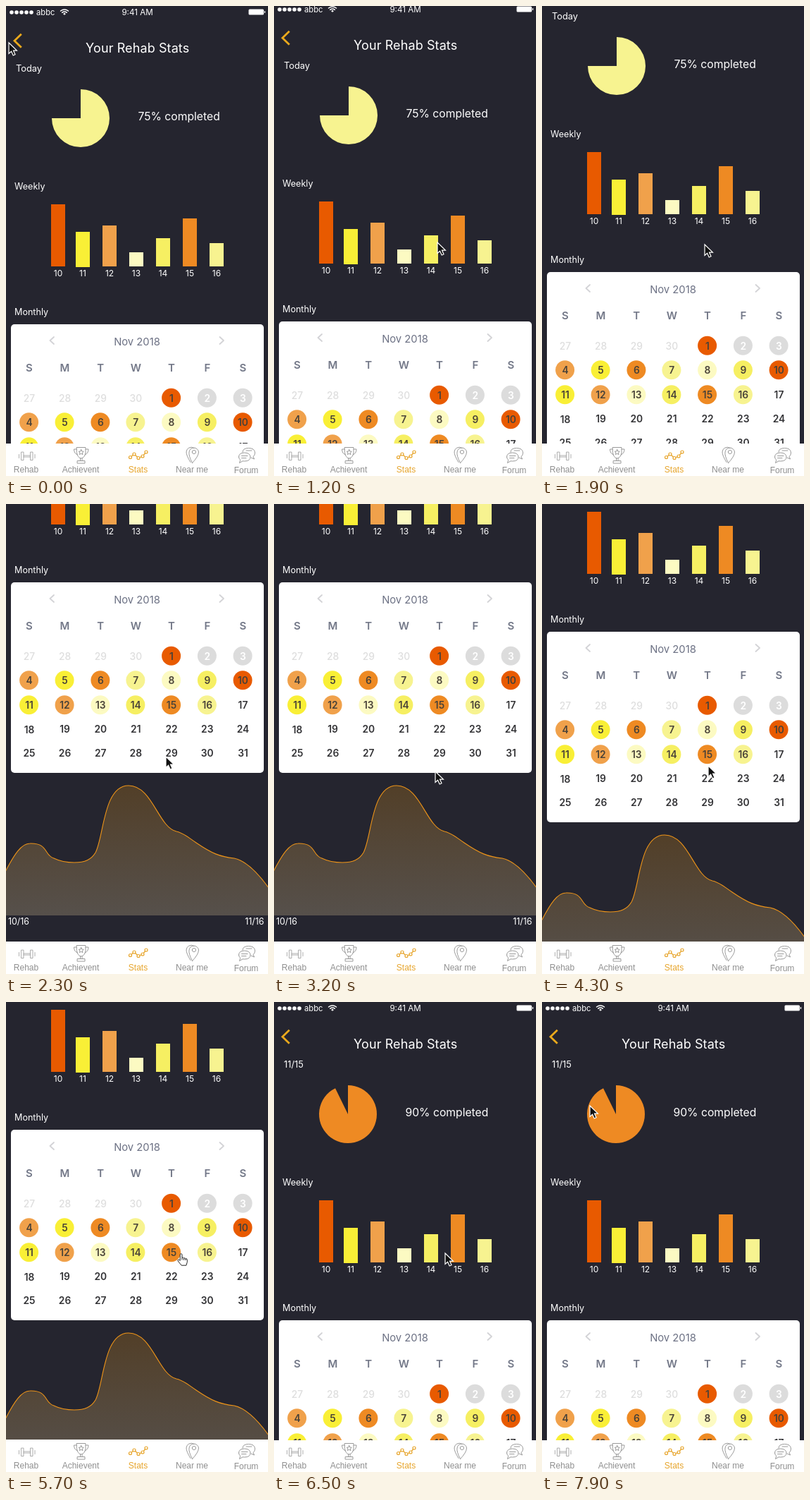
Write an HTML page that moves like this. It is 372 px wide and 666 px high and loops after 8 s.

```html
<!DOCTYPE html>
<html lang="en">
<head>
<meta charset="utf-8">
<title>Rehab stats</title>
<style>
  html, body { margin: 0; width: 100%; height: 100%; overflow: hidden; background: #25252f; }
  svg { display: block; width: 372px; height: 666px; font-family: Inter, Roboto, sans-serif; }
  .line { fill: none; stroke-linecap: round; stroke-linejoin: round; }
  .tab { font-family: "Liberation Sans", Arial, sans-serif; }
</style>
</head>
<body>
<svg id="stage" viewBox="0 0 372 666">
  <defs>
    <linearGradient id="hill" x1="0" y1="0" x2="0" y2="1">
      <stop offset="0" stop-color="#523f28"/>
      <stop offset="1" stop-color="#56504b"/>
    </linearGradient>
  </defs>
  <rect width="372" height="666" fill="#25252f"/>
  <g id="page"></g>
  <g id="tabs"></g>
  <g id="cursor">
    <path id="arrow" d="M0 0V15.5L3.6 12.2L6.2 18L9 16.8L6.5 11.1H11.4Z" fill="#111" stroke="#fff" stroke-width="1.2"/>
    <path id="hand" d="M4.2 10.5V2.3Q4.2.7 5.6.7T7 2.3V6.5Q9 5.4 9.6 7Q11.5 6.2 12 7.8Q14.3 7.2 14.3 9.5V12.5L12.9 17.2H6.2Q3.6 14.3 1 10.7Q.7 9 2.4 9Z M7 6.5V9.5 M9.6 7.2V9.8 M12 8V10" fill="#fff" stroke="#222" stroke-width="1"/>
  </g>
</svg>
<script>
const NS = "http://www.w3.org/2000/svg";
const $ = id => document.getElementById(id);
const page = $("page"), tabs = $("tabs");

function add(parent, tag, attrs, text) {
  const el = document.createElementNS(NS, tag);
  for (const k in attrs) el.setAttribute(k, attrs[k]);
  if (text !== undefined) el.textContent = text;
  parent.appendChild(el);
  return el;
}
const rect = (p, x, y, width, height, fill, rx = 0) => add(p, "rect", { x, y, width, height, fill, rx });
const dot = (p, cx, cy, r, fill) => add(p, "circle", { cx, cy, r, fill });
const line = (p, d, stroke, width = 1) => add(p, "path", { d, stroke, "stroke-width": width, class: "line" });
// y is the vertical middle of the capitals
const label = (p, s, x, y, size, fill = "#fff", more = {}) =>
  add(p, "text", { x, y: y + size * 0.364, "font-size": size, fill, ...more }, s);
const mid = { "text-anchor": "middle" };

const RED = "#e85a00", YELLOW = "#f9ef36", TAN = "#f0a14b", PALE = "#fcfac2",
      LEMON = "#f6ef62", ORANGE = "#ee8a23", CREAM = "#f7f390", GREY = "#dcdcdc";
const dayColors = [RED, GREY, GREY, TAN, YELLOW, ORANGE, CREAM, PALE, LEMON,
                   RED, YELLOW, TAN, PALE, LEMON, ORANGE, CREAM];

// status bar and title
for (let i = 0; i < 5; i++) dot(page, 8 + i * 7, 9, 2.8, "#fff");
label(page, "abbc", 43, 9, 11.2);
line(page, "M77.5 7Q83 2.8 88.5 7M79.7 9.3Q83 6.8 86.3 9.3", "#fff", 1.5);
dot(page, 83, 11.2, 1.4, "#fff");
label(page, "9:41 AM", 186.5, 9, 11.6, "#fff", mid);
rect(page, 344.5, 4.5, 21.5, 8, "#fff", 1.5);
rect(page, 366.8, 7, 1.3, 3, "#fff", 0.6);
add(page, "path", { d: "M21.8 39.8L12 49.3L21.8 58.8", fill: "none", stroke: "#eaa91c", "stroke-width": 2.8 });
label(page, "Your Rehab Stats", 186.7, 59.5, 18, "#fff", { ...mid, "letter-spacing": 0.1 });

// daily progress
const dayTitle = label(page, "Today", 14, 88.5, 12.8);
const pie = add(page, "path", {});
const progress = label(page, "75% completed", 187.5, 156.5, 15.7);

function slice(cx, missing) {
  const a = missing * Math.PI / 180, r = 41, cy = 159;
  return `M${cx} ${cy}V${cy - r}A${r} ${r} 0 1 1 ${cx - r * Math.sin(a)} ${cy - r * Math.cos(a)}Z`;
}

// weekly bars
label(page, "Weekly", 12, 255.5, 12.6);
const barX = [64, 99, 137, 175, 213, 251, 289];
[281, 320, 311, 349, 329, 301, 336].forEach((top, i) => {
  rect(page, barX[i], top, 20, (i === 1 ? 370 : 369) - top, dayColors[9 + i]);
  label(page, 10 + i, barX[i] + 10, 379, 12, "#fff", mid);
});

// calendar
label(page, "Monthly", 12, 433.5, 12.6);
rect(page, 7, 451, 359, 270, "#fff", 5);
line(page, "M68 469L62.5 474L68 479M303.5 469L309 474L303.5 479", "#d3d3d6", 1.8);
label(page, "Nov 2018", 186, 476, 14.8, "#6c7184", mid);
const colX = [33, 83.5, 134.3, 184.3, 235, 285.8, 336.5];
const rowY = [555.5, 590, 625, 659.2, 693.3];
[..."SMTWTFS"].forEach((d, i) =>
  label(page, d, colX[i], 512.5, 15, "#737888", { ...mid, "font-weight": 600 }));
for (let i = 0; i < 35; i++) {
  const day = i < 4 ? 27 + i : i - 3;
  const x = colX[i % 7], y = rowY[Math.floor(i / 7)];
  const color = i < 4 ? null : dayColors[day - 1];
  if (color) dot(page, x - 0.4, y - 0.2, 13.5, color);
  const ink = i < 4 ? "#dedede" : color === GREY ? "#fff" : color ? "#494238" : "#333336";
  const drop = i === 3 || day === 18 ? 0.8 : 0;
  label(page, day, x, y + drop, 13.8, ink, { ...mid, "font-weight": i < 4 ? 500 : 600 });
}

// monthly curve
const curve = "M-1 861C12 836 22 821 34 821C60 820 54 838 68 842C78 847 88 848 97 848" +
  "C112 848 121 844 127 834C139 812 138 739 174 739C208 739 216 798 242 804" +
  "C252 806 258 812 270 820C292 835 304 840 324 842C343 846 360 866 373 884";
add(page, "path", { d: curve + "V923H-1Z", fill: "url(#hill)" });
line(page, curve, "#ee9418", 1.1);
label(page, "10/16", 3, 931, 12.4);
label(page, "11/16", 366.5, 931, 12.4, "#fff", { "text-anchor": "end" });

// tab bar
const tabBack = rect(tabs, 0, 620, 372, 47, "#fff");
const ICON = "#9a9a9a", ACTIVE = "#e7a52c";
line(tabs, "M18.5 635.5V640.5M21.5 632.5V643.5H25V632.5ZM34.5 632.5V643.5H38V632.5ZM41 635.5V640.5M25 637H34.5M25 639H34.5", ICON, 0.8);
line(tabs, "M100.5 625.5H113V633Q112 640 106.7 641Q101.5 640 100.5 633ZM100.5 628H96.5Q96.5 634 101.5 636" +
  "M113 628H117Q117 634 112 636M105.5 641V644.5M108 641V644.5M101.5 648H112V644.5H101.5Z" +
  "M106.7 628.5L107.8 631L110.3 631.3L108.4 633L109 635.6L106.7 634.3L104.4 635.6L105 633L103.1 631.3L105.6 631Z", ICON);
const nodes = [[176.5, 639.5], [182, 635], [188, 640.5], [194, 638], [199, 632]];
line(tabs, "M" + nodes.map(n => n.join(" ")).join("L"), ACTIVE, 1.3);
nodes.forEach(([x, y]) => dot(tabs, x, y, 2, "#fff").setAttribute("style", `stroke:${ACTIVE};stroke-width:1.2`));
line(tabs, "M262 646.5Q256 637 256 632A7 7 0 0 1 267 626.5M264.5 647.5Q259 637 260 632A6.8 6.8 0 0 1 273.5 632Q273.5 638 264.5 647.5Z" +
  "M264.3 632A2.6 2.6 0 1 0 269.5 632A2.6 2.6 0 1 0 264.3 632", ICON);
line(tabs, "M336 632Q336 626.5 344.5 626.5T353.5 633Q353.5 636.5 351 638.5L352.5 642L348 640" +
  "M330.5 639Q330.5 633 338.5 633T347 639Q347 645 338.5 645L336 644.8L331.5 647.5L332.7 643.2Q330.5 641.5 330.5 639Z" +
  "M334.5 637.5H343M334.5 640.5H341M341 630H349", ICON);
[["Rehab", 28.5], ["Achievent", 106], ["Stats", 187.5], ["Near me", 264], ["Forum", 341]].forEach(([s, x], i) =>
  label(tabs, s, x, i === 4 ? 657.8 : 657, 12, i === 2 ? ACTIVE : "#8f8f8f", { ...mid, class: "tab" }));

// motion tables: [ms, value...]
const LOOP = 8000, STEP = 100, TAP = 6000, HOVER = 4700;
const scrollKeys = [[0, 0], [1100, 0], [1200, 4], [1500, 18], [1800, 52], [1900, 74], [2000, 145],
  [2100, 235], [2200, 312], [2300, 340], [3300, 340], [3400, 333], [3500, 311], [3600, 270], [LOOP, 270]];
const cursorKeys = [[0, 4, 52], [150, 4, 52], [450, 95, 165], [800, 222, 322], [1000, 232, 335], [1200, 232, 335],
  [1900, 231, 338], [2300, 227, 358], [3400, 229, 384], [3700, 229, 384], [4600, 240, 364], [5000, 243, 356],
  [6500, 243, 356], [7200, 245, 293], [7500, 172, 232], [7800, 76, 153], [7900, 68, 147], [LOOP, 68, 147]];

function at(keys, t) {
  let i = 1;
  while (i < keys.length - 1 && keys[i][0] < t) i++;
  const a = keys[i - 1], b = keys[i], k = (t - a[0]) / (b[0] - a[0]);
  return a.slice(1).map((v, j) => v + (b[j + 1] - v) * k);
}

let shown = null;
function showDay(detail) {
  if (shown === detail) return;
  shown = detail;
  dayTitle.textContent = detail ? "11/15" : "Today";
  progress.textContent = detail ? "90% completed" : "75% completed";
  progress.setAttribute("x", detail ? 186.5 : 187.5);
  pie.setAttribute("d", detail ? slice(105, 26) : slice(106, 90));
  pie.setAttribute("fill", detail ? ORANGE : CREAM);
  tabBack.setAttribute("y", detail ? 621 : 620);
}

function draw(t) {
  const detail = t >= TAP;
  const hover = t >= HOVER && !detail;
  showDay(detail);
  const y = detail ? 0 : Math.round(at(scrollKeys, t)[0]);
  page.setAttribute("transform", `translate(0 ${-y})`);
  const [cx, cy] = at(cursorKeys, t).map(Math.round);
  $("cursor").setAttribute("transform", `translate(${cx} ${cy})`);
  $("arrow").style.display = hover ? "none" : "";
  $("hand").style.display = hover ? "" : "none";
}

const start = performance.now();
function tick() {
  const t = (performance.now() - start) % LOOP;
  draw(Math.floor(t / STEP) * STEP);
  requestAnimationFrame(tick);
}
tick();
</script>
</body>
</html>
```
